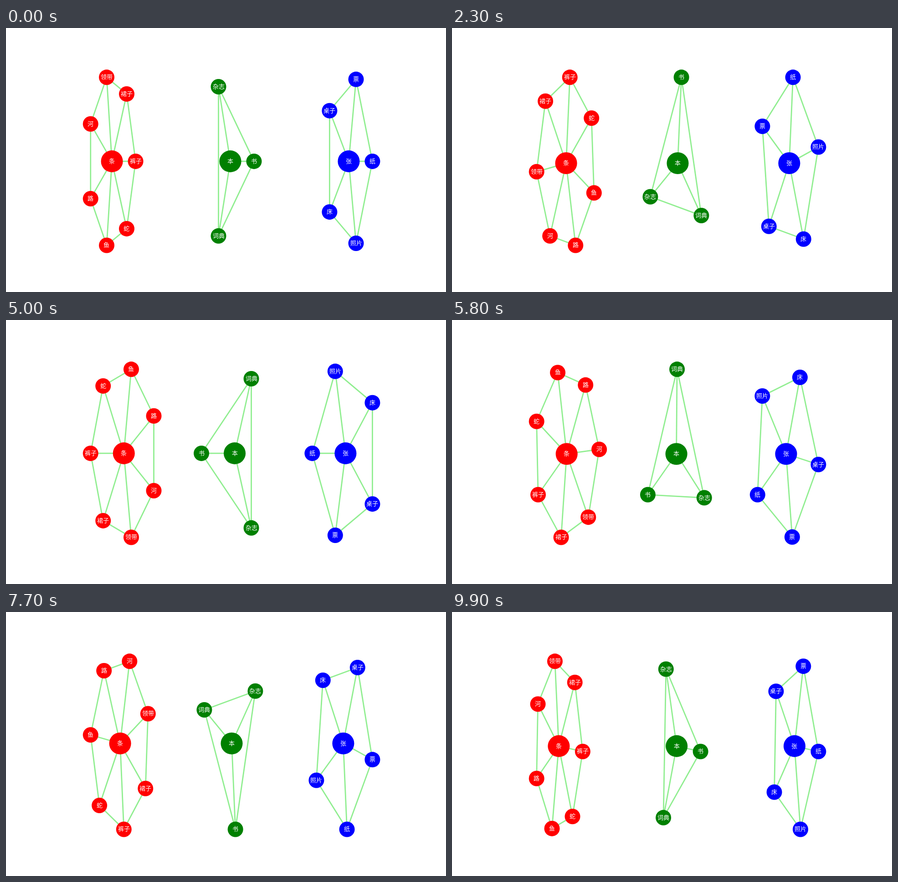
Animation of 966x580 px, one loop 10 s. Source, as an HTML page with a canvas:

```html
<!DOCTYPE html>
<html lang="zh-Hans">
<head>
<meta charset="utf-8">
<title>量词</title>
<style>
html, body { margin: 0; width: 100%; height: 100%; overflow: hidden; background: #fff; }
canvas { display: block; }
</style>
</head>
<body>
<canvas id="stage" width="966" height="580"></canvas>
<script>
const ctx = document.getElementById('stage').getContext('2d');
const FRAMES = 100, STEP = 100;
const SPACING = 10;
// Plot area that the outermost nodes always touch
const MID_X = 495.07, MID_Y = 292.9, HALF_W = 309.36, HALF_H = 184.55;

const wheels = [
  { hub: '条', color: 'red', rim: ['裤子', '裙子', '领带', '河', '路', '鱼', '蛇'] },
  { hub: '本', color: 'green', rim: ['书', '杂志', '词典'] },
  { hub: '张', color: 'blue', rim: ['纸', '票', '桌子', '床', '照片'] }
];

function layout(phase) {
  const radius = 2 + Math.sin(Math.PI * phase);
  const graphs = wheels.map(({ hub, color, rim }, w) => ({
    color,
    hub: { label: hub, x: w * SPACING, y: 0, size: 24.05 },
    rim: rim.map((label, i) => {
      const a = 2 * Math.PI * (phase + i / rim.length);
      return { label, x: w * SPACING + radius * Math.cos(a), y: -radius * Math.sin(a), size: 17 };
    })
  }));
  const nodes = graphs.flatMap(g => [g.hub, ...g.rim]);
  fit(nodes, 'x', MID_X, HALF_W);
  fit(nodes, 'y', MID_Y, HALF_H);
  return graphs;
}

function fit(nodes, axis, mid, half) {
  const values = nodes.map(n => n[axis]);
  const min = Math.min(...values), max = Math.max(...values);
  for (const n of nodes) n[axis] = mid + half * (2 * (n[axis] - min) / (max - min) - 1);
}

function line(a, b) {
  ctx.beginPath();
  ctx.moveTo(a.x, a.y);
  ctx.lineTo(b.x, b.y);
  ctx.stroke();
}

function disc(n, color) {
  ctx.fillStyle = color;
  ctx.beginPath();
  ctx.arc(n.x, n.y, n.size, 0, 2 * Math.PI);
  ctx.fill();
}

function text(n) {
  const width = ctx.measureText(n.label).width;
  ctx.fillStyle = '#fff';
  ctx.fillText(n.label, Math.round(n.x - width / 2), Math.round(n.y + 4));
}

function draw(phase) {
  ctx.fillStyle = '#fff';
  ctx.fillRect(0, 0, 966, 580);
  ctx.strokeStyle = 'lightgreen';
  ctx.lineWidth = 2.78;
  ctx.font = '13px "Noto Sans CJK SC", "Noto Sans CJK", sans-serif';
  for (const { hub, rim, color } of layout(phase)) {
    rim.forEach((n, i) => {
      line(hub, n);
      line(n, rim[(i + 1) % rim.length]);
    });
    for (const n of [hub, ...rim]) {
      disc(n, color);
      text(n);
    }
  }
}

function tick() {
  draw(Math.floor(performance.now() / STEP) % FRAMES / FRAMES);
  requestAnimationFrame(tick);
}
tick();
</script>
</body>
</html>
```
